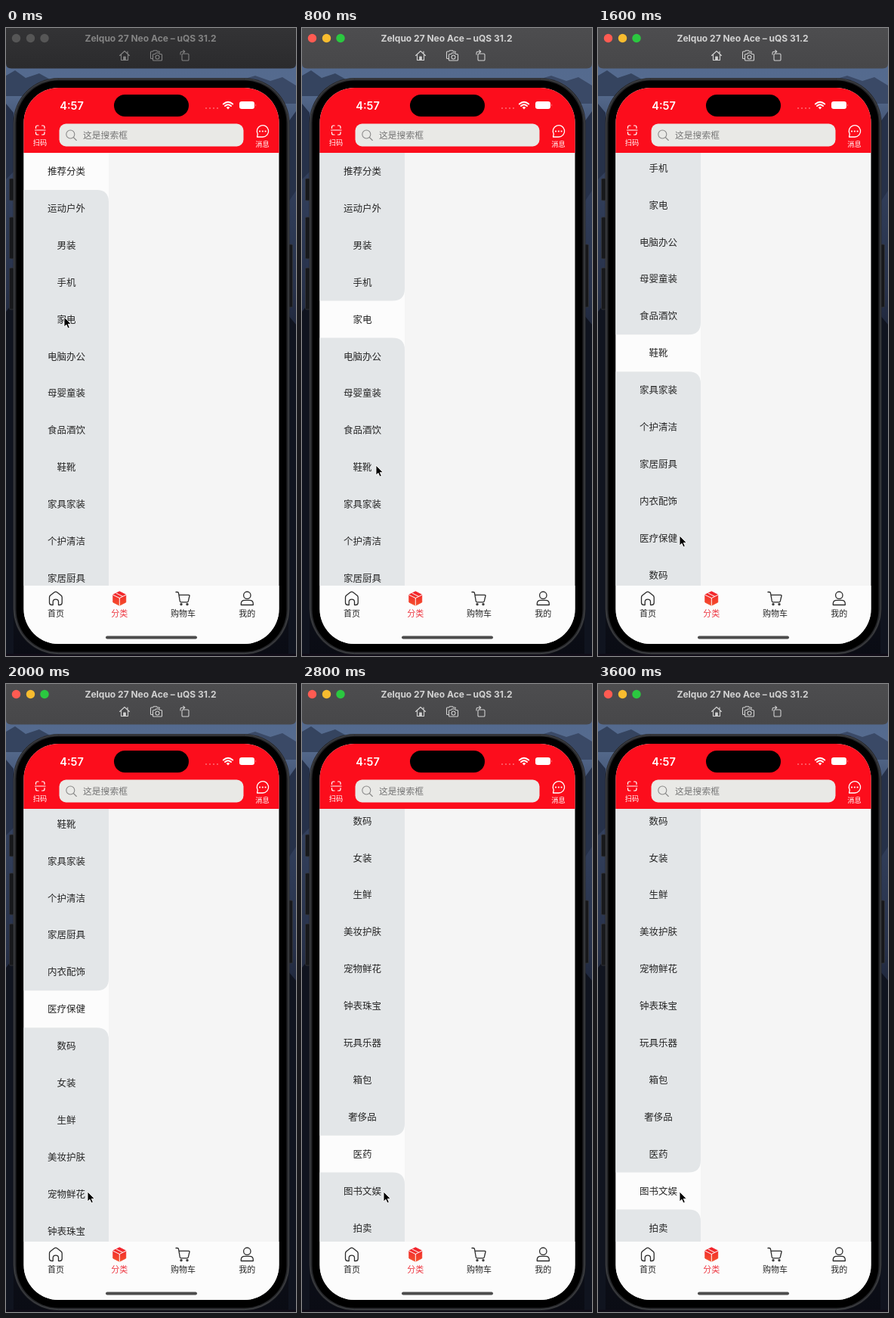
An HTML page for the animation above (3.8 s loop, 384 by 830 pixels).

```html
<!DOCTYPE html>
<html lang="zh-CN">
<head>
<meta charset="utf-8">
<title>分类</title>
<style>
  html, body { margin: 0; width: 100%; height: 100%; overflow: hidden; background: #0b0e17; }
  svg { display: block; width: 100%; height: 100%; }
  text { font-family: "Noto Sans CJK SC", "Noto Sans CJK", sans-serif; text-anchor: middle; }
  .latin { font-family: Inter, sans-serif; }
  .line { fill: none; stroke-linecap: round; stroke-linejoin: round; }
</style>
</head>
<body>
<svg viewBox="0 0 384 830">
  <defs>
    <linearGradient id="sky" x1="0" y1="0" x2="0" y2="1">
      <stop offset="0" stop-color="#50688f"/>
      <stop offset=".1" stop-color="#566b8e"/>
      <stop offset=".2" stop-color="#34425f"/>
      <stop offset=".42" stop-color="#27314a"/>
      <stop offset=".56" stop-color="#161b29"/>
      <stop offset="1" stop-color="#0a0c14"/>
    </linearGradient>
    <linearGradient id="bar" x1="0" y1="0" x2="0" y2="1">
      <stop id="barTop"/>
      <stop id="barEnd" offset="1"/>
    </linearGradient>
    <linearGradient id="cube" x1="0" y1="0" x2="0" y2="1">
      <stop offset="0" stop-color="#f2202c"/>
      <stop offset="1" stop-color="#f4502c"/>
    </linearGradient>
    <clipPath id="screen"><rect x="23.5" y="79" width="338" height="735" rx="46"/></clipPath>
    <clipPath id="list"><rect x="23" y="165" width="113" height="572"/></clipPath>
  </defs>

  <!-- wallpaper -->
  <rect width="384" height="830" fill="url(#sky)"/>
  <path d="M0 63L12 56L26 66L44 60L62 70V90H0Z" fill="#35445f"/>
  <path d="M384 76L366 65L350 70L330 63L300 72V100H384Z" fill="#3a4966"/>
  <path d="M0 100L10 112V190L0 200ZM384 110L374 124V230L384 215Z" fill="#263149"/>
  <path d="M0 375L10 362V830H0ZM384 392L374 380V830H384Z" fill="#10141f"/>
  <rect y="827" width="384" height="3" fill="#110d18"/>

  <!-- window bar -->
  <path d="M0 0H384V47Q384 53.5 377 53.5H7Q0 53.5 0 47Z" fill="url(#bar)"/>
  <g id="lights">
    <circle cx="13.5" cy="13.5" r="5.7"/>
    <circle cx="32.5" cy="13.5" r="5.7"/>
    <circle cx="51" cy="13.5" r="5.7"/>
  </g>
  <g id="chrome">
    <text class="latin" x="191.5" y="17.5" font-size="12" font-weight="700" fill="currentColor" id="title">Zelquo 27 Neo Ace – uQS 31.2</text>
    <g class="line" stroke="currentColor" stroke-width="1.1">
      <path d="M150.5 36.5L157 30.5L163.5 36.5M152.5 35.5V42.5H161.5V35.5M161 31V33.5"/>
      <path d="M155.8 42V38H158.2V42Z" fill="currentColor"/>
      <path d="M194 40.5H192.5Q191.500 40.500 191.500 39.500V32Q191.500 31 192.500 31H194.500L195.500 29.800H199.500L200.500 31H202.500Q203.500 31 203.500 32"/>
      <path d="M195.500 34.500H197.500L198.500 33H202.500L203.500 34.500H205.500Q206.500 34.500 206.500 35.500V42Q206.500 43 205.500 43H195.500Q194.500 43 194.500 42V35.500Q194.500 34.500 195.500 34.500Z"/>
      <circle cx="200.500" cy="38.500" r="2.500"/>
      <rect x="233" y="34" width="9" height="9" rx="1.300"/>
      <path d="M231 35V33Q231 31.200 233 31.200H236.500M234.800 29.300L236.800 31.200L234.800 33.100"/>
    </g>
  </g>

  <!-- phone body -->
  <g fill="#17181b" stroke="#34363b" stroke-width=".8">
    <rect x="4.500" y="199" width="6" height="29" rx="1.500"/>
    <rect x="4.500" y="250" width="6" height="55" rx="1.500"/>
    <rect x="4.500" y="317" width="6" height="55" rx="1.500"/>
    <rect x="374" y="286" width="5.500" height="83" rx="1.500"/>
  </g>
  <rect x="9.500" y="66" width="366" height="762" rx="60" fill="#26272a"/>
  <rect x="10.800" y="67.300" width="363.400" height="759.400" rx="58.700" fill="none" stroke="#45474b"/>
  <rect x="13.500" y="69.500" width="358" height="755" rx="56" fill="#000"/>

  <g clip-path="url(#screen)">
    <rect x="23" y="79" width="339" height="736" fill="#f5f5f5"/>
    <g clip-path="url(#list)">
      <rect x="23" y="165" width="113" height="572" fill="#fcfcfc"/>
      <g id="rows" fill="#262626" font-size="12.500">
        <path id="above" fill="#e3e6e8"/>
        <path id="below" fill="#e3e6e8"/>
      </g>
    </g>

    <!-- header -->
    <rect x="23" y="79" width="339" height="86" fill="#fc0d1c"/>
    <rect x="143" y="88" width="99" height="29" rx="14.500" fill="#000"/>
    <g fill="#fff">
      <text class="latin" x="87" y="107.500" font-size="14.500" font-weight="600">4:57</text>
      <g opacity=".4">
        <circle cx="265" cy="106" r="1"/><circle cx="270" cy="106" r="1"/>
        <circle cx="275" cy="106" r="1"/><circle cx="280" cy="106" r="1"/>
      </g>
      <path d="M294 107.500L291.700 105Q294 103.200 296.300 105Z"/>
      <rect x="309" y="97" width="20" height="10" rx="3.200"/>
      <path d="M330.300 100.300Q332 102 330.300 103.700Z" opacity=".6"/>
      <text x="45" y="155" font-size="9.200">扫码</text>
      <text x="339.500" y="156.500" font-size="9.200">消息</text>
      <circle cx="336" cy="136.500" r="1.100"/>
      <circle cx="339.800" cy="136.500" r="1.100"/>
      <circle cx="343.600" cy="136.500" r="1.100"/>
    </g>
    <g class="line" stroke="#fff">
      <path stroke-width="1.900" d="M287.800 100.500Q294 94.800 300.200 100.500M290 103Q294 99.300 298 103"/>
      <path stroke-width="1.200" d="M39.500 132.500V131Q39.500 129 41.500 129H43M47.500 129H49Q51 129 51 131V132.500M51 137.500V139Q51 141 49 141H47.500M43 141H41.500Q39.500 141 39.500 139V137.500M38.500 135H52"/>
      <path stroke-width="1.300" d="M332.500 144H340A7.700 7.700 0 1 0 333.300 140.200Z"/>
    </g>
    <rect x="70.500" y="126.500" width="244" height="30" rx="9" fill="#e9e9e6"/>
    <g class="line" stroke="#8a8a8a" stroke-width="1.100">
      <circle cx="85.300" cy="140.500" r="5.500"/>
      <path d="M89.300 144.500L93.300 148.500"/>
    </g>
    <text x="102" y="146" font-size="11.800" fill="#777" style="text-anchor:start">这是搜索框</text>

    <!-- tab bar -->
    <rect x="23" y="737" width="339" height="78" fill="#fcfcfc"/>
    <g class="line" stroke="#2b2b2b" stroke-width="1.300">
      <path d="M57.500 752.500Q57.500 751 58.600 750L64 745.800Q65.800 744.600 67.600 745.800L73 750Q74.200 751 74.200 752.500V759.500Q74.200 762.500 71.200 762.500H69.500V758.500Q69.500 755.200 65.800 755.200Q62.200 755.200 62.200 758.500V762.500H60.500Q57.500 762.500 57.500 759.500Z"/>
      <path d="M225 745.500H227Q228.300 745.500 228.500 746.800L230.300 757.500Q230.500 758.800 231.800 758.800H239.800Q241 758.800 241.300 757.600L243 750.500Q243.200 749.300 242 749.300H229"/>
      <circle cx="232" cy="761.700" r="1"/>
      <circle cx="240" cy="761.700" r="1"/>
      <circle cx="319.300" cy="749.700" r="4.700"/>
      <path d="M311.300 762.500V761Q311.300 756.300 316 756.300H322.600Q327.300 756.300 327.300 761V762.500Z"/>
    </g>
    <path d="M150.300 744.800L158.700 749V759L150.300 763.300L141.800 759V749Z" fill="url(#cube)" stroke="url(#cube)" stroke-linejoin="round"/>
    <path class="line" d="M141.800 749.300L150.300 753.500L158.700 749.300M150.300 753.500V763.300M146 747L154.500 751.300" stroke="#fcfcfc" stroke-width="1"/>
    <g font-size="11" fill="#262626">
      <text x="66" y="778">首页</text>
      <text x="150.300" y="778" fill="#ee3a44">分类</text>
      <text x="234.500" y="778">购物车</text>
      <text x="319.300" y="778">我的</text>
    </g>
    <rect x="132" y="803.500" width="121" height="4" rx="2" fill="#4c4c4c"/>
  </g>

  <path id="cursor" d="M0 0V13L3 10.300L5 15L7.300 14L5.300 9.400H9.300Z" fill="#000" stroke="#fff" stroke-width=".9" stroke-linejoin="round"/>
</svg>
<script>
const LOOP = 3800, STEP = 200, ROW = 48.9, TOP = 165, RIGHT = 136;
const names = ("推荐分类 运动户外 男装 手机 家电 电脑办公 母婴童装 食品酒饮 鞋靴 家具家装 个护清洁 " +
  "家居厨具 内衣配饰 医疗保健 数码 女装 生鲜 美妆护肤 宠物鲜花 钟表珠宝 玩具乐器 箱包 奢侈品 医药 图书文娱 拍卖").split(" ");
const ACTIVATE = 400, SCROLL_MS = 300, MAX_SCROLL = 693;
// time of tap, row
const taps = [[400, 4], [850, 8], [1650, 13], [2050, 18], [2450, 23], [3400, 24]];
// time, x, y
const pointer = [[400, 77, 382], [800, 98, 578], [1000, 104, 606], [1200, 108, 657], [1400, 108, 671]];

const $ = id => document.getElementById(id);
const set = (el, attrs) => { for (const k in attrs) el.setAttribute(k, attrs[k]); };
const clamp = (v, a, b) => Math.min(b, Math.max(a, v));
const ease = p => p * p * (3 - 2 * p);
const scrollTo = row => clamp((row - 5) * ROW - 265 + TOP + 4 * ROW - 91.6 + 0, 0, MAX_SCROLL);
const centred = row => clamp(TOP + (row + .5) * ROW - 429.7, 0, MAX_SCROLL);

names.forEach((name, i) => {
  const label = document.createElementNS("http://www.w3.org/2000/svg", "text");
  set(label, { x: 80, y: TOP + (i + .5) * ROW + 4.6 });
  label.textContent = name;
  $("rows").append(label);
});

function listState(t) {
  let row = 0, scroll = 0;
  for (const [at, next] of taps) {
    if (t < at) break;
    row = next;
    scroll += (centred(next) - scroll) * ease(clamp((t - at) / SCROLL_MS, 0, 1));
  }
  return { row, scroll };
}

function pointerAt(t) {
  const i = pointer.findIndex(p => p[0] > t);
  if (i < 0) return pointer[pointer.length - 1].slice(1);
  if (!i) return pointer[0].slice(1);
  const [t0, x0, y0] = pointer[i - 1], [t1, x1, y1] = pointer[i];
  const p = (t - t0) / (t1 - t0);
  return [x0 + (x1 - x0) * p, y0 + (y1 - y0) * p];
}

function draw(ms) {
  const t = Math.floor(ms % LOOP / STEP) * STEP;
  const active = t >= ACTIVATE;
  const { row, scroll } = listState(t);
  const y0 = TOP + row * ROW, y1 = y0 + ROW, r = 16;

  set($("rows"), { transform: `translate(0 ${-scroll})` });
  set($("above"), { d: row ? `M23 ${TOP}H${RIGHT}V${y0 - r}Q${RIGHT} ${y0} ${RIGHT - r} ${y0}H23Z` : "" });
  set($("below"), { d: `M23 ${y1}H${RIGHT - r}Q${RIGHT} ${y1} ${RIGHT} ${y1 + r}V${TOP + names.length * ROW}H23Z` });
  set($("cursor"), { transform: `translate(${pointerAt(t)})` });

  const lights = active ? ["#ff5b52", "#f8bc2f", "#2bc840"] : Array(3).fill("#565656");
  lights.forEach((fill, i) => set($("lights").children[i], { fill }));
  set($("barTop"), { "stop-color": active ? "#4d4d4f" : "#333335" });
  set($("barEnd"), { "stop-color": active ? "#474749" : "#2b2b2d" });
  set($("chrome"), { color: active ? "#d2d2d2" : "#848484" });
}

function tick() {
  draw(performance.now());
  requestAnimationFrame(tick);
}
tick();
</script>
</body>
</html>
```
